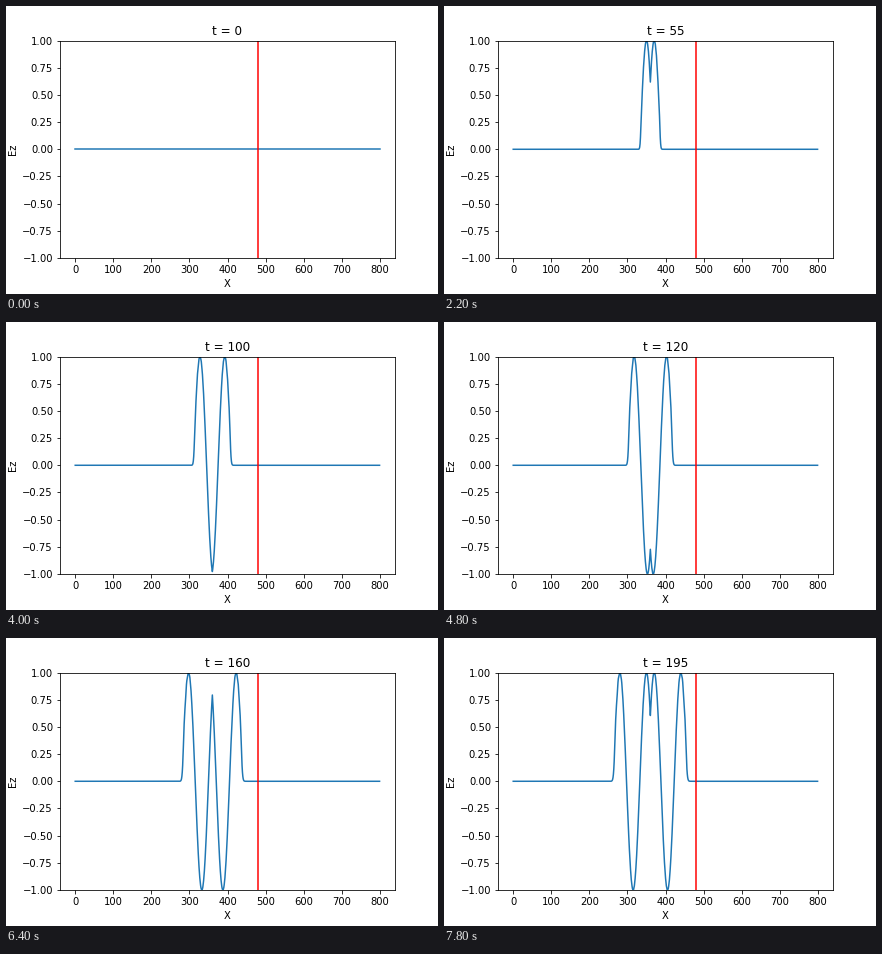
These frames come from a looping animation (432 by 288 pixels, 8 s). A matplotlib script:

```python
import numpy as np
import matplotlib.pyplot as plt
from matplotlib.animation import FuncAnimation

CELLS = 800
SOURCE = 360
BOUNDARY = 480
COURANT = 0.5
OMEGA = 0.045      # radians per time step
STEP = 5           # time steps per frame
FRAMES = 40


def simulate(steps):
    """1D FDTD run driven by a sine held at SOURCE; returns Ez per step."""
    ez = np.zeros(CELLS)
    hy = np.zeros(CELLS)
    history = [ez.copy()]
    for n in range(1, steps + 1):
        ez[1:] += COURANT * (hy[:-1] - hy[1:])
        ez[SOURCE] = np.sin(OMEGA * n)
        hy[:-1] += COURANT * (ez[:-1] - ez[1:])
        history.append(ez.copy())
    return history


fields = simulate(STEP * (FRAMES - 1))

fig, ax = plt.subplots(figsize=(6, 4), dpi=72)
fig.subplots_adjust(left=0.125, right=0.9, bottom=0.125, top=0.88)
line, = ax.plot(np.arange(CELLS), fields[0])
ax.axvline(BOUNDARY, color="r")
ax.set_ylim(-1, 1)
ax.set_xlabel("X")
ax.set_ylabel("Ez")
title = ax.set_title("t = 0")


def draw(i):
    t = i * STEP
    line.set_ydata(fields[t])
    title.set_text(f"t = {t}")
    return line, title


anim = FuncAnimation(fig, draw, frames=FRAMES, interval=200,
                     init_func=lambda: draw(0), repeat=True, repeat_delay=0)
plt.show()
```
